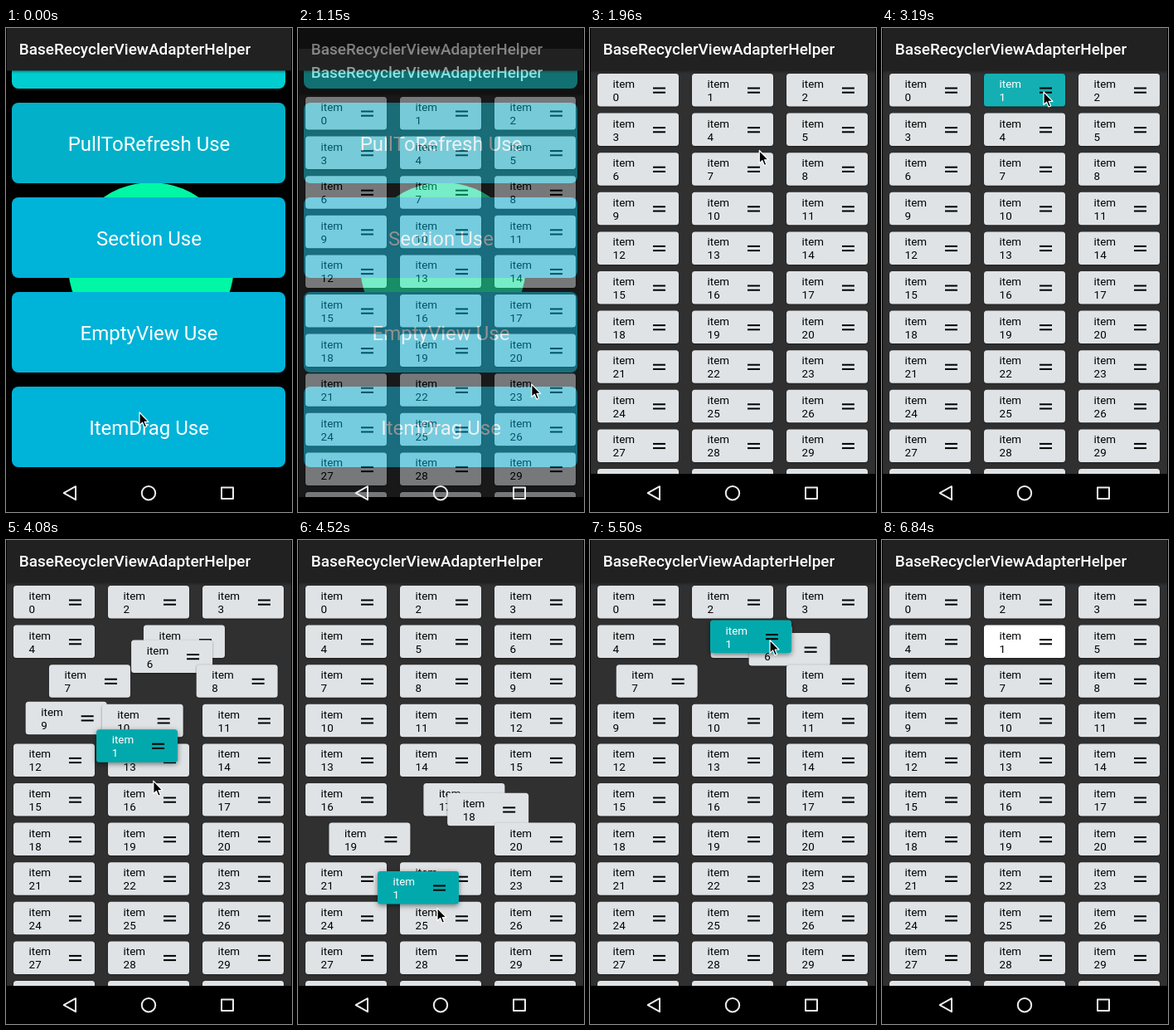
Recreate the animation shown at these times as an HTML page with a canvas. Size 345 px wide and 583 px high, loop 7960 ms.

```html
<!DOCTYPE html>
<html lang="en">
<head>
<meta charset="utf-8">
<title>Drag list demo</title>
<style>
  html, body { margin: 0; width: 100%; height: 100%; overflow: hidden; background: #000; }
  canvas { display: block; }
</style>
</head>
<body>
<canvas id="stage" width="345" height="583"></canvas>
<script>
const LOOP = 7960, STEP = 88.8, W = 345, H = 583, BODY = 537, BLEED = 3;
const OPEN = 1110, GRAB = 3180, LIFT = 3690, RELEASE = 5800, DROP = 6000, LEAVE = 6035;
const ROW = 47.6, COL = 114, TOP = 55, SLACK = 12;

const stage = document.getElementById('stage').getContext('2d');
const sheet = document.createElement('canvas');
sheet.width = W;
sheet.height = BODY + BLEED;
const page = sheet.getContext('2d');
page.translate(0, BLEED);

// Key points: [time, x, y]
const ARRIVE = [
  [790, 161, 463], [1145, 282, 429], [1510, 281, 427], [1690, 111, 251],
  [1780, 111, 251], [1942, 204, 148], [2050, 222, 112], [2560, 195, 77]
];
const DRAG = [
  [LIFT, 123, 55], [4352, 99, 353], [4430, 96, 399], [4530, 96, 399], [4610, 96, 422],
  [5000, 96, 422], [5235, 140, 126], [5430, 145, 114], [5495, 145, 96.5], [RELEASE, 145, 104]
];
const DEPART = [
  [LEAVE, 217, 126], [6205, 213, 368], [6300, 212, 368],
  [6560, 209, 532], [6650, 209, 532], [6738, 250, 566]
];

const clamp = v => Math.max(0, Math.min(1, v));
const mix = (a, b, k) => a + (b - a) * k;
const mixPoint = (a, b, k) => [mix(a[0], b[0], k), mix(a[1], b[1], k)];
const ease = k => (1 - Math.cos(Math.PI * clamp(k))) / 2;
const slot = i => [9 + COL * (i % 3), TOP + ROW * Math.floor(i / 3)];

function track(keys, t) {
  const n = keys.findIndex(k => k[0] > t);
  if (n === 0) return keys[0].slice(1);
  if (n < 0) return keys[keys.length - 1].slice(1);
  const a = keys[n - 1], b = keys[n];
  return mixPoint(a.slice(1), b.slice(1), (t - a[0]) / (b[0] - a[0]));
}

// The dragged item takes a row of the middle column once it is well past it.
function findSwaps() {
  const swaps = [];
  for (let t = LIFT, row = 0; t < RELEASE; t += 2) {
    const v = (track(DRAG, t)[1] - TOP - SLACK) / ROW;
    const next = Math.max(Math.floor(v), Math.min(row, Math.ceil(v)), 0);
    if (next !== row) swaps.push([t, 1 + 3 * next]);
    row = next;
  }
  return swaps;
}
const SWAPS = findSwaps();

function box(g, x, y, w, h, r, color) {
  g.fillStyle = color;
  g.beginPath();
  g.roundRect(x, y, w, h, r);
  g.fill();
}

function text(g, str, x, y, font, color, align = 'left') {
  g.font = font + ' Roboto, sans-serif';
  g.textAlign = align;
  g.fillStyle = color;
  g.fillText(str, x, y);
}

function header(g) {
  g.fillStyle = '#212121';
  g.fillRect(1, -BLEED, 343, 51.5 + BLEED);
  text(g, 'BaseRecyclerViewAdapterHelper', 15.8, 32, '500 18.95px', '#fff');
  const fade = g.createLinearGradient(0, 51, 0, 55);
  fade.addColorStop(0, 'rgba(0,0,0,.3)');
  fade.addColorStop(1, 'rgba(0,0,0,0)');
  g.fillStyle = fade;
  g.fillRect(0, 51.5, W, 4);
}

function home(g) {
  g.fillStyle = '#000';
  g.fillRect(0, 0, W, H);
  g.fillStyle = '#00f7a5';
  g.beginPath();
  g.arc(175, 286, 100, 0, 7);
  g.fill();
  const cards = [['', '#00cdcf'], ['PullToRefresh Use', '#02b1c9'], ['Section Use', '#00b3d8'],
    ['EmptyView Use', '#00b3d8'], ['ItemDrag Use', '#00b3d8']];
  cards.forEach(([label, color], i) => {
    const y = 114 * i - 24;
    box(g, 7, y, 330, 97, 8, color);
    text(g, label, 172.5, y + 58, '24px', '#fff', 'center');
  });
  header(g);
}

function cell(g, n, [x, y], fill = '#dfe3e6', ink = '#000', lift = 2) {
  g.shadowColor = 'rgba(0,0,0,.5)';
  g.shadowBlur = lift;
  g.shadowOffsetY = lift / 3;
  box(g, x, y, 98, 39.5, 3.5, fill);
  g.shadowColor = 'transparent';
  text(g, 'item', x + 18.6, y + 17, '13.4px', ink);
  text(g, n, x + 18.6, y + 33, '13.4px', ink);
  g.fillStyle = '#000';
  g.fillRect(x + 67, y + 16.5, 15, 2);
  g.fillRect(x + 67, y + 21.7, 15, 2);
}

function place(n, t) {
  let from = n, to = n, start = 0;
  for (const [time, p] of SWAPS) {
    const i = n > 1 && n <= p ? n - 1 : n;
    if (t >= time && i !== to) [from, to, start] = [to, i, time];
  }
  return mixPoint(slot(from), slot(to), ease((t - start) / 250));
}

function dragged(g, t) {
  const at = mixPoint(track(DRAG, t), slot(4), ease((t - RELEASE) / (DROP - RELEASE)));
  if (t < GRAB) cell(g, 1, at);
  else if (t < LIFT) cell(g, 1, at, '#14afb3', '#fff');
  else if (t < DROP) cell(g, 1, at, '#02a9ac', '#fff', 6);
  else cell(g, 1, at, '#fff');
}

function grid(g, t) {
  g.fillStyle = '#303030';
  g.fillRect(0, 0, W, BODY);
  for (let n = 0; n < 33; n++) if (n !== 1) cell(g, n, place(n, t));
  dragged(g, t);
  header(g);
}

function navIcons(g) {
  g.strokeStyle = '#ececec';
  g.lineWidth = 2;
  g.lineJoin = 'round';
  g.beginPath();
  g.moveTo(69.7, 560.2);
  g.lineTo(84, 552.2);
  g.lineTo(84, 568.2);
  g.closePath();
  g.moveTo(180.2, 560.2);
  g.arc(172, 560.2, 8.2, 0, 7);
  g.rect(260, 553.4, 14, 13.5);
  g.stroke();
}

// While dragging, the item trails the pointer by one step.
function pointerAt(t) {
  if (t < 2560) return track(ARRIVE, t);
  if (t >= LEAVE - STEP / 2) return track(DEPART, t);
  const [x, y] = track(DRAG, t + STEP);
  return [x + 72, y + 22];
}

function pointer(g, [x, y]) {
  g.save();
  g.translate(x, y);
  g.beginPath();
  [[0, 0], [0, 15.5], [3.6, 12.2], [6, 18], [8.6, 17], [6.2, 11.3], [11, 11.3]]
    .forEach(p => g.lineTo(...p));
  g.closePath();
  g.fillStyle = '#000';
  g.strokeStyle = '#fff';
  g.lineWidth = 1.2;
  g.fill();
  g.stroke();
  g.restore();
}

function draw(t) {
  const g = stage;
  if (t < OPEN + 350) home(g);
  if (t >= OPEN) {
    const rise = Math.round(47 * (1 - clamp((t - OPEN) / 350)) ** 5);
    grid(page, t);
    g.globalAlpha = 1 - (1 - clamp((t - OPEN) / 200)) ** 4;
    g.fillStyle = '#000';
    g.fillRect(0, 0, W, rise - BLEED);
    g.drawImage(sheet, 0, rise - BLEED);
    g.globalAlpha = 1;
    g.fillStyle = '#000';
    g.fillRect(0, BODY + rise, W, H);
  }
  g.fillStyle = '#000';
  g.fillRect(0, 0, 1, H);
  g.fillRect(344, 0, 1, H);
  navIcons(g);
  if (t < 6800) pointer(g, pointerAt(t));
}

// Motion is sampled at a fixed step, as in a screen recording.
function tick() {
  const now = performance.now() % LOOP;
  draw(Math.floor((now + 10) / STEP) * STEP - 10);
  requestAnimationFrame(tick);
}
tick();
</script>
</body>
</html>
```
